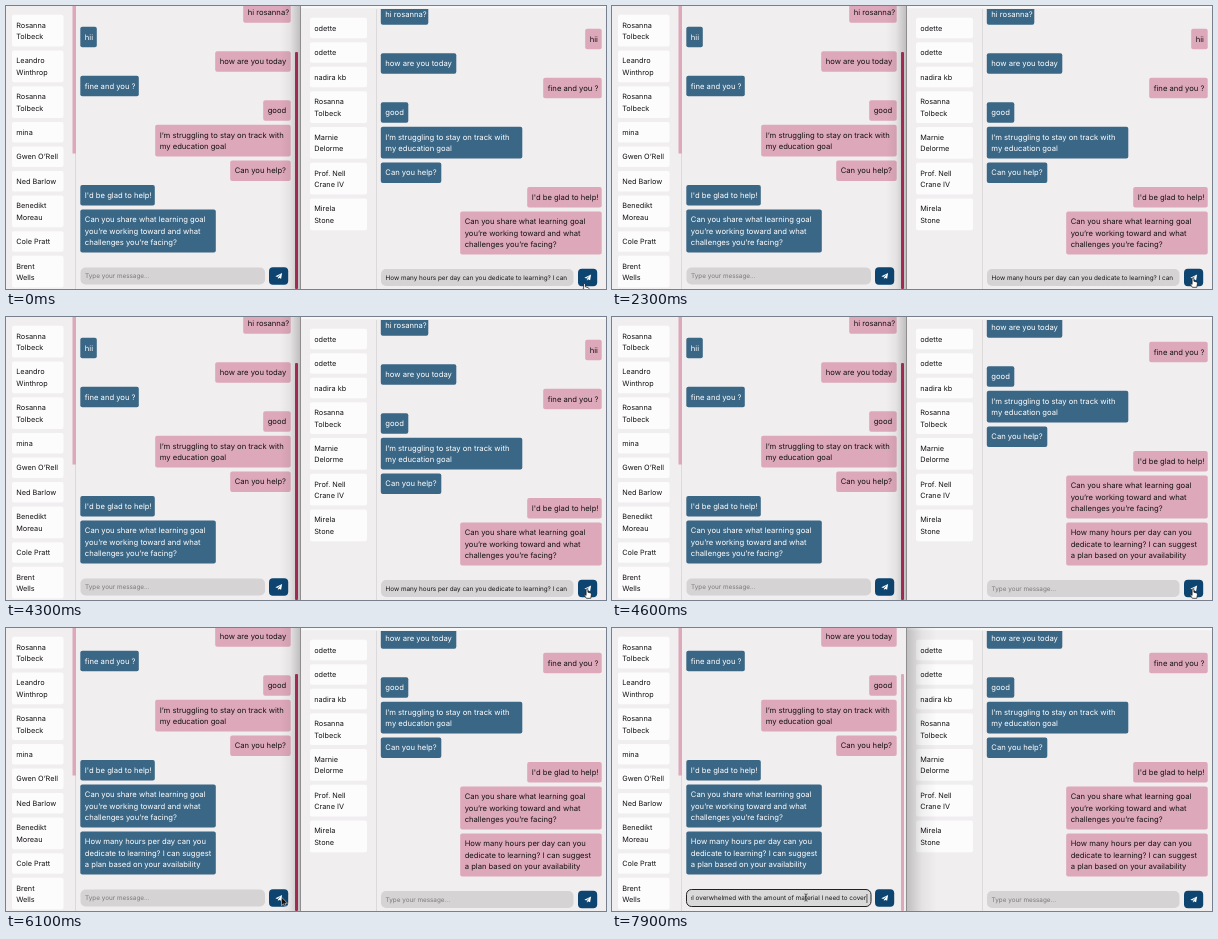
An HTML page that plays this animation: 600x283 px, repeating every 8000 ms.

```html
<!DOCTYPE html>
<html lang="en">
<head>
<meta charset="utf-8">
<title>Chat</title>
<style>
  html, body { margin: 0; width: 100%; height: 100%; overflow: hidden; background: #f0eeef; }
  svg { display: block; width: 600px; height: 283px; }
  text { font-family: Inter, sans-serif; font-size: 7.65px; fill: #141214; text-rendering: geometricPrecision; white-space: pre; }
  .name { font-size: 7.3px; }
  .field { font-size: 6.35px; }
  .hint { fill: #7b7a7b; }
  .light { fill: #fff; }
</style>
</head>
<body>
<svg id="stage" viewBox="0 0 600 283"></svg>
<script>
const BLUE = '#3b6786', PINK = '#dda8ba', NAVY = '#0d4570', CRIMSON = '#bd315e';
const LOOP = 8000, SEND = 4450, RECEIVE = 4700, FOCUS = 6500, PASTE = 7450;
const SHIFT = 47, GAP = 4, LINE = 11.5;

// side: 0 is the left person, 1 the right person; no width means a full-width bubble
const messages = [
  [1, 47, 'hi rosanna?'],
  [0, 16, 'hii'],
  [1, 75, 'how are you today'],
  [0, 58, 'fine and you ?'],
  [1, 27, 'good'],
  [1, 0, 'I’m struggling to stay on track with|my education goal'],
  [1, 60, 'Can you help?'],
  [0, 74, "I'd be glad to help!"],
  [0, 0, 'Can you share what learning goal|you’re working toward and what|challenges you’re facing?'],
  [0, 0, 'How many hours per day can you|dedicate to learning? I can suggest|a plan based on your availability']
];
const leftNames = ['Rosanna|Tolbeck', 'Leandro|Winthrop', 'Rosanna|Tolbeck', 'mina', 'Gwen O’Rell',
  'Ned Barlow', 'Benedikt|Moreau', 'Cole Pratt', 'Brent|Wells'];
const rightNames = ['odette', 'odette', 'nadira kb', 'Rosanna|Tolbeck', 'Marnie|Delorme',
  'Prof. Nell|Crane IV', 'Mirela|Stone'];

const rect = (x, y, w, h, fill, r = 0, extra = '') =>
  `<rect x="${x}" y="${y}" width="${w}" height="${h}" rx="${r}" fill="${fill}" ${extra}/>`;
const text = (x, y, s, cls = '', extra = '') =>
  `<text x="${x}" y="${y}" class="${cls}" ${extra}>${s}</text>`;
const boxHeight = lines => 20.5 + (lines.length - 1) * 11.25;

function card(x, y, w, lines, fill, pad, cls) {
  return rect(x, y, w, boxHeight(lines), fill, 2) +
    lines.map((s, i) => text(x + pad, y + 12.9 + i * LINE, s, cls)).join('');
}

function sidebar(x, y, w, names) {
  return names.map(name => {
    const lines = name.split('|');
    const out = card(x, y, w, lines, '#fdfcfd', 4.2, 'name');
    y += boxHeight(lines) + GAP;
    return out;
  }).join('');
}

function thread(id, x0, x1, top, wide, ownSide) {
  let y = top;
  return `<g id="${id}">` + messages.map(([side, width, body], i) => {
    const lines = body.split('|'), own = side === ownSide, w = (width || wide) + .5;
    const out = card(own ? x1 - w : x0, y, w, lines, own ? PINK : BLUE, 4.5, own ? '' : 'light');
    y += boxHeight(lines) + GAP;
    return i === messages.length - 1 ? `<g id="${id}New">${out}</g>` : out;
  }).join('') + '</g>';
}

function composer(id, x, y, w, buttonX) {
  return rect(x, y, w, 17, '#d5d3d4', 5, `id="${id}Box"`) +
    text(x + 4.6, y + 10.9, 'Type your message...', 'field hint', `id="${id}Hint"`) +
    rect(buttonX, y - .3, 19.2, 17.6, NAVY, 4) +
    `<path transform="translate(${buttonX + 6.4} ${y + 5.4}) scale(.84)" fill="#fff"
      d="M8 0 6.8 7 4.2 5.9 3 7.6V5.4L6.3 1.7 2.2 5 0 4.1Z"/>`;
}

const clip = (id, x, y, w, h) => `<clipPath id="${id}">${rect(x, y, w, h, '#000')}</clipPath>`;
const fade = (id, from, to) => `<linearGradient id="${id}"><stop stop-opacity="${from}"/>
  <stop offset=".5" stop-opacity="${(from + to) / 4}"/><stop offset="1" stop-opacity="${to}"/></linearGradient>`;

stage.innerHTML =
  clip('leftField', 79, 258, 176, 25) + clip('rightField', 379, 258, 183, 25) + clip('rightPane', 295, 3, 305, 280) +
  fade('fadeIn', 0, .2) + fade('fadeOut', .2, 0) +
  rect(0, 0, 600, 283, '#f0eeef') +
  sidebar(6, 8.7, 51.5, leftNames) +
  rect(69, 0, 1, 283, '#dcd9db') +
  rect(66.5, 0, 3.5, 147.5, PINK) +
  thread('left', 74.3, 284.7, -3.7, 135, 1) +
  rect(289, 46, 3, 237, CRIMSON, 1, 'id="bar"') +
  composer('left', 74.5, 261.5, 184.5, 263) +
  `<g clip-path="url(#leftField)">${text(254.2, 272.3, 'I feel overwhelmed with the amount of material I need to cover',
    'field', 'id="leftTyped" text-anchor="end"')}</g>` +
  rect(79, 266, .7, 9, '#222', 0, 'id="caret"') +
  rect(295.2, 0, 305, 2.2, '#f9f8f9') +
  sidebar(304, 11.8, 57, rightNames) +
  rect(370, 3, 1, 280, '#dcd9db') +
  `<g clip-path="url(#rightPane)">${thread('right', 374.8, 595.7, -1.7, 141, 0)}</g>` +
  composer('right', 375, 263, 192.5, 572) +
  `<g clip-path="url(#rightField)">${text(379.6, 273.9,
    'How many hours per day can you dedicate to learning? I can suggest', 'field', 'id="rightTyped"')}</g>` +
  // the window in front casts its shadow on the other one
  rect(274, 0, 20, 283, 'url(#fadeIn)', 0, 'id="leftShade"') +
  rect(295, 0, 30, 283, 'url(#fadeOut)', 0, 'id="rightShade"') +
  rect(294, 0, 1, 283, '#8f8d8f') +
  `<g id="pointer">
    <path id="hand" fill="#fff" stroke="#111" stroke-width=".7" stroke-linejoin="round"
      d="M-.9 5.6V.5Q0-.6.9.5V3.4L3.8 4.2Q4.6 4.6 4.4 6L3.8 9.5H-.6L-3 6.2Q-2.6 5-.9 6.6Z"/>
    <path id="arrow" fill="#111" stroke="#fff" stroke-width=".5" d="M0 0V8.4L2 6.6 3.3 9.5 4.6 8.9 3.4 6.1H6Z"/>
    <path id="beam" fill="none" stroke="#222" stroke-width=".7" d="M-1.6-3.5Q0-3.5 0-2.7Q0-3.5 1.6-3.5M0-2.7V2.7M-1.6 3.5Q0 3.5 0 2.7Q0 3.5 1.6 3.5"/>
  </g>`;

const $ = id => document.getElementById(id);
const show = (id, on) => $(id).setAttribute('display', on ? 'inline' : 'none');

// time, x, y
const path = [[0, 578.5, 277.5], [700, 581, 271.8], [5400, 581, 271.8], [6400, 192, 268.5],
  [6900, 192, 268.5], [7400, 194, 269.5], [LOOP, 194, 269.5]];

function pointerAt(t) {
  const i = path.findIndex(p => p[0] > t), a = path[i - 1], b = path[i];
  const u = (t - a[0]) / (b[0] - a[0]), k = u * u * (3 - 2 * u);
  return [a[1] + (b[1] - a[1]) * k, a[2] + (b[2] - a[2]) * k];
}

function scroll(id, done) {
  $(id).setAttribute('transform', `translate(0 ${done ? -SHIFT : 0})`);
  show(id + 'New', done);
}

function draw(t) {
  const sent = t >= SEND, focused = t >= FOCUS, pasted = t >= PASTE;
  scroll('right', sent);
  scroll('left', t >= RECEIVE);
  show('rightTyped', !sent);
  show('rightHint', sent);
  show('leftTyped', pasted);
  show('leftHint', !pasted);
  show('caret', focused);
  show('leftShade', !focused);
  show('rightShade', focused);
  $('caret').setAttribute('x', pasted ? 254.6 : 78.8);
  $('leftBox').setAttribute('stroke', focused ? '#222' : 'none');
  $('leftBox').setAttribute('fill', focused ? '#dad9da' : '#d5d3d4');
  $('bar').setAttribute('fill', focused ? PINK : CRIMSON);

  const [x, y] = pointerAt(t);
  const hand = x > 571, beam = x > 375 && x < 567 || x < 259;
  $('pointer').setAttribute('transform', `translate(${x} ${y})`);
  show('hand', hand);
  show('beam', beam);
  show('arrow', !hand && !beam);
}

const start = performance.now();
function tick() {
  draw((performance.now() - start) % LOOP);
  requestAnimationFrame(tick);
}
tick();
</script>
</body>
</html>
```
